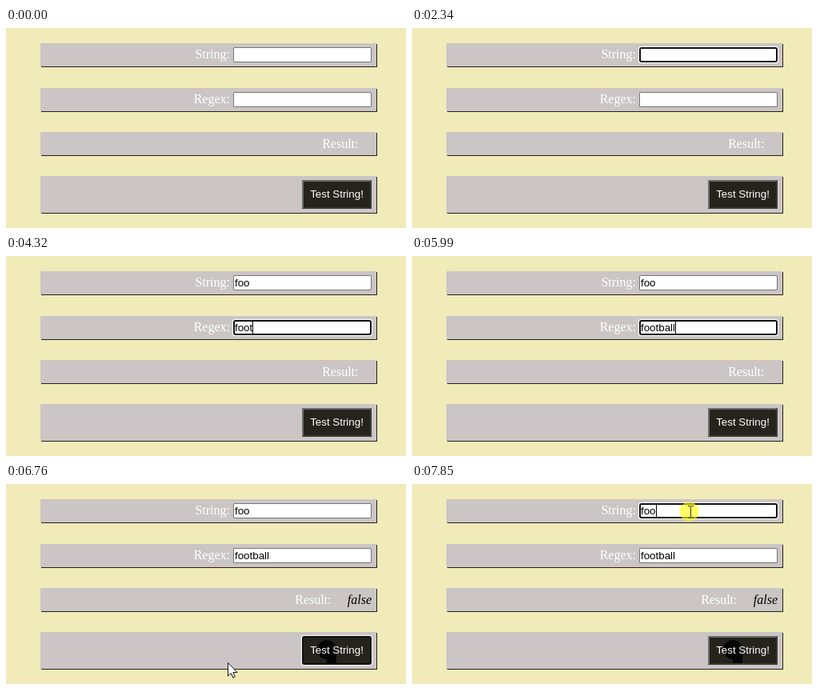
Write an HTML page with a canvas that moves like this. It is 500 px wide and 250 px high and loops after 8 s.

```html
<!DOCTYPE html>
<html lang="en">
<head>
<meta charset="utf-8">
<title>String test form</title>
<style>
html, body { margin: 0; width: 100%; height: 100%; overflow: hidden; background: #f1eab9; }
canvas { display: block; }
</style>
</head>
<body>
<canvas id="stage" width="500" height="250"></canvas>
<script>
const ctx = document.getElementById('stage').getContext('2d');
const LOOP = 8000;
const SERIF = '16px "Liberation Serif", "Times New Roman", serif';
const SANS = '13.333px "Liberation Sans", Arial, sans-serif';

// Each track is a list of [start time, value]; values hold until the next one.
const stringText = [[0, ''], [2740, 'f'], [2820, 'fo'], [2970, 'foo']];
const regexText = [
  [0, ''], [3910, 'f'], [4080, 'fo'], [4150, 'foo'], [4320, 'foot'],
  [4470, 'footb'], [4620, 'footba'], [4770, 'footbal'], [4870, 'football']
];
const focusTrack = [[0, ''], [840, 'string'], [3290, 'regex'], [6450, 'button'], [7850, 'string']];
const hoverTrack = [[0, false], [374, true], [1310, false], [7604, true]];
const caretTrack = [
  [0, true], [1310, false], [1860, true], [2340, false], [2740, true],
  [3840, false], [3910, true], [5420, false], [5990, true]
];
const haloTrack = [[0, false], [750, true], [840, false], [6450, true], [6520, false], [7850, true]];
const pointerTrack = [
  [0, null],
  [140, ['arrow', 490, 58]], [218, ['arrow', 470, 51]], [296, ['arrow', 447, 45]],
  [374, ['beam', 425, 39]], [452, ['beam', 409, 36]], [530, ['beam', 402, 36]],
  [1090, ['beam', 416, 36]], [1160, ['beam', 434, 36]], [1240, ['beam', 449, 36]],
  [1310, null],
  [6210, ['arrow', 426, 240]], [6290, ['arrow', 410, 222]], [6370, ['arrow', 401, 208]],
  [6690, ['arrow', 352, 222]], [6760, ['arrow', 277, 223]],
  [7070, ['arrow', 272, 214]], [7146, ['arrow', 271, 190]], [7222, ['arrow', 278, 159]],
  [7298, ['arrow', 294, 142]], [7375, ['arrow', 310, 124]], [7450, ['arrow', 325, 92]],
  [7527, ['arrow', 338, 60]], [7604, ['beam', 346, 38]], [7680, ['beam', 348, 35]]
];

function at(track, t) {
  let value = track[0][1];
  for (const [start, v] of track) if (t >= start) value = v;
  return value;
}

function box(x, y, w, h, color) {
  ctx.fillStyle = color;
  ctx.fillRect(x, y, w, h);
}

function rounded(x, y, w, h, r, color) {
  ctx.fillStyle = color;
  ctx.beginPath();
  ctx.roundRect(x, y, w, h, r);
  ctx.fill();
}

function write(text, x, y, font, color, align = 'left') {
  ctx.font = font;
  ctx.fillStyle = color;
  ctx.textAlign = align;
  ctx.fillText(text, x, y);
}

function row(y, h) {
  box(44, y + 1, 420, h, '#24221c');
  box(43, y, 420, h, '#cbc5c5');
}

function field(y, text, focused, hovered, caretOn) {
  if (focused) {
    rounded(283, y - 1, 175, 21, 3, '#fff');
    rounded(284, y, 173, 19, 3, '#101010');
    rounded(286, y + 2, 169, 15, 1, '#fff');
  } else {
    rounded(284, y, 173, 19, 2, hovered ? '#4f4f4f' : '#767676');
    rounded(285, y + 1, 171, 17, 1, '#fff');
  }
  write(text, 286, y + 14, SANS, '#000');
  if (focused && caretOn) {
    const x = 286 + Math.round(ctx.measureText(text).width);
    box(x, y + 2, 1, 15, '#000');
  }
}

function button(focused, marked) {
  if (focused) {
    rounded(369, 189, 89, 38, 4, '#fff');
    rounded(370, 190, 87, 36, 3, '#101010');
  } else {
    box(370, 190, 87, 36, '#3b3b37');
    box(370, 190, 86, 2, '#6c6e6c');
    box(370, 190, 2, 35, '#6c6e6c');
  }
  box(372, 192, 83, 32, '#25231c');
  if (marked) {
    ctx.fillStyle = '#050504';
    ctx.beginPath();
    ctx.arc(401, 207, 12, 0, Math.PI * 2);
    ctx.fill();
    box(401, 208, 12, 16, '#050504');
  }
  write('Test String!', 413.5, 212, SANS, '#fff', 'center');
}

function halo(x, y) {
  ctx.fillStyle = 'rgba(255, 255, 0, 0.6)';
  ctx.beginPath();
  ctx.arc(x - 1.5, y - 0.5, 12, 0, Math.PI * 2);
  ctx.fill();
}

function arrow(x, y) {
  const tip = [[0, 0], [0, 16.5], [3.8, 13], [6.2, 18.4], [8.8, 17.3], [6.4, 12], [11.5, 12]];
  ctx.beginPath();
  for (const [dx, dy] of tip) ctx.lineTo(x + dx + 0.5, y + dy + 0.5);
  ctx.closePath();
  ctx.fillStyle = '#fff';
  ctx.fill();
  ctx.strokeStyle = '#111';
  ctx.lineWidth = 1;
  ctx.stroke();
}

function beam(x, y) {
  box(x, y - 7, 1, 14, '#3a3a30');
  for (const end of [y - 8, y + 7]) {
    box(x - 3, end, 3, 1, '#3a3a30');
    box(x + 1, end, 3, 1, '#3a3a30');
  }
}

function draw(t) {
  const focus = at(focusTrack, t);
  const hover = at(hoverTrack, t);
  const caret = at(caretTrack, t);
  const done = t >= 6520;

  box(0, 0, 500, 250, '#f1eab9');
  row(19, 29);
  row(75, 29);
  row(130, 29);
  row(185, 46);

  write('String:', 280, 38, SERIF, '#fff', 'right');
  write('Regex:', 280, 94, SERIF, '#fff', 'right');
  write('Result:', done ? 406.5 : 440.5, 150, SERIF, '#fff', 'right');
  if (done) write('false', 457, 150, 'italic ' + SERIF, '#000', 'right');

  field(24, at(stringText, t), focus === 'string', hover, caret);
  field(80, at(regexText, t), focus === 'regex', false, caret);
  button(focus === 'button', done);

  const pointer = at(pointerTrack, t);
  if (pointer) {
    const [shape, x, y] = pointer;
    if (at(haloTrack, t)) halo(x, y);
    (shape === 'beam' ? beam : arrow)(x, y);
  }
}

const begin = performance.now();
function tick() {
  draw((performance.now() - begin) % LOOP);
  requestAnimationFrame(tick);
}
tick();
</script>
</body>
</html>
```
